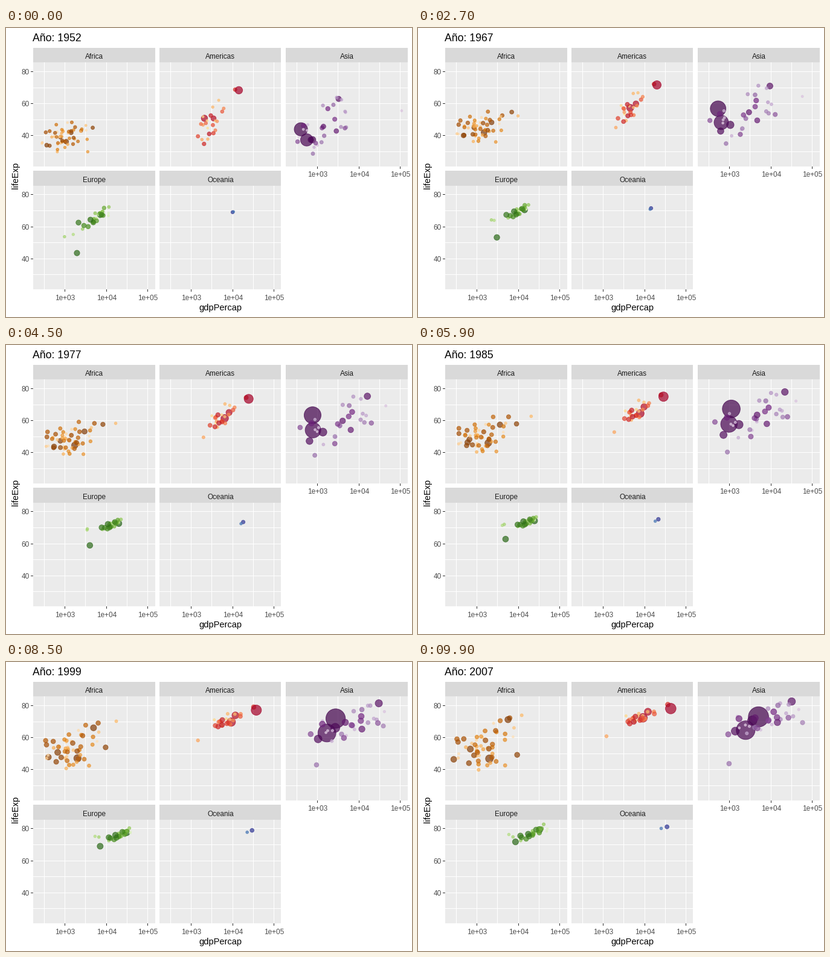
Recreate the animation shown at these times as a matplotlib script. Size 672 px wide and 480 px high, loop 10000 ms.

```python
import numpy as np
import matplotlib.pyplot as plt
from matplotlib.animation import FuncAnimation
from matplotlib.colors import LinearSegmentedColormap
from matplotlib.patches import Rectangle

plt.rcParams["font.family"] = "Liberation Sans"

W, H, FRAMES = 672, 480, 100
X_LO, X_SCALE = 2.2355, 68.62      # log10 at the panel's left edge, px per decade
Y_LO, Y_SCALE = 20.65, 2.66        # years at the panel's bottom edge, px per year
LEFTS, BOTTOMS = (45.1, 254.0, 463.1), (230.4, 434.8)
PANEL_W, PANEL_H, STRIP_H = 201.9, 172.65, 24.4
MAX_POP = 1318.7                   # millions


def cloud(seed, n, max_pop, power, rho, start, middle, end):
    """Random tracks; each stage is (mean log gdp, sd, mean life, sd)."""
    rng = np.random.default_rng(seed)
    u, v = np.clip(rng.normal(size=(2, n)), -1.7, 1.7)
    life_z = rho * u + np.sqrt(1 - rho ** 2) * v
    cols = [max_pop * np.linspace(0.15, 1, n) ** power]
    for gdp, gdp_sd, life, life_sd in (start, middle, end):
        drift = 0.2 * rng.normal(size=(2, n))
        cols += [gdp + gdp_sd * (u + drift[0]), life + life_sd * (life_z + drift[1])]
    return np.transpose(cols)


# Landmark tracks: population, then (log10 gdp, life) at start, middle and end
AFRICA = np.vstack([
    (33, 3.39, 43.1, 3.73, 59.7, 3.79, 72.3),
    (12, 3.55, 30.0, 3.45, 39.7, 3.68, 42.7),
    (65, 2.89, 39.1, 2.87, 47.8, 2.44, 46.5),
    (80, 3.15, 41.9, 3.50, 54.6, 3.75, 71.3),
    (76, 2.56, 34.1, 2.75, 44.7, 2.84, 52.9),
    (6, 3.38, 42.7, 4.26, 59.8, 4.08, 74.0),
    (135, 3.03, 36.3, 3.25, 45.2, 3.30, 46.9),
    (44, 3.67, 45.0, 3.93, 58.0, 3.97, 49.3),
    cloud(3, 44, 42, 2, 0.45,
          (2.98, 0.27, 39.8, 4.8), (3.08, 0.31, 49.3, 5.2), (3.15, 0.38, 55, 8)),
])
AMERICAS = np.vstack([
    (190, 3.32, 50.9, 3.84, 62.5, 3.96, 72.4),
    (33, 4.06, 68.8, 4.35, 75.0, 4.56, 80.7),
    (8.5, 3.26, 37.6, 3.29, 50.7, 3.08, 60.9),
    (109, 3.54, 50.8, 3.94, 66.3, 4.08, 76.2),
    (301, 4.15, 68.4, 4.41, 74.1, 4.63, 78.2),
    cloud(5, 20, 44, 2, 0.5,
          (3.50, 0.18, 52, 8.5), (3.79, 0.18, 65.5, 5), (3.88, 0.21, 73.7, 2.7)),
])
ASIA = np.vstack([
    (32, 2.89, 28.8, 2.94, 39.1, 2.99, 43.8),
    (150, 2.84, 37.5, 2.82, 48.5, 3.14, 64.1),
    (1318.7, 2.60, 44.0, 2.93, 64.8, 3.70, 73.0),
    (1110, 2.74, 37.4, 2.92, 55.4, 3.39, 64.7),
    (223, 2.88, 37.5, 3.16, 54.4, 3.55, 70.7),
    (127, 3.51, 63.0, 4.25, 76.2, 4.50, 82.6),
    (2.5, 5.03, 55.6, 4.63, 70.3, 4.67, 77.6),
    (48, 2.52, 36.3, 2.60, 57.0, 2.97, 62.1),
    cloud(8, 25, 90, 2.5, 0.6,
          (3.20, 0.34, 48.5, 8.5), (3.66, 0.42, 62, 7.5), (3.93, 0.42, 72.3, 5)),
])
EUROPE = np.vstack([
    (3.6, 3.20, 55.2, 3.56, 69.6, 3.77, 76.4),
    (4.6, 2.99, 53.8, 3.58, 70.3, 3.87, 74.9),
    (82, 3.85, 67.5, 4.33, 73.2, 4.51, 79.4),
    (71, 3.29, 43.6, 3.63, 60.3, 3.93, 71.8),
    cloud(11, 26, 61, 3, 0.9,
          (3.75, 0.21, 65.9, 3.8), (4.17, 0.14, 72.8, 1.9), (4.37, 0.19, 77.6, 2.7)),
])
OCEANIA = np.array([
    (20.4, 4.00, 69.1, 4.28, 74.1, 4.54, 81.2),
    (4.1, 4.02, 69.4, 4.22, 73.0, 4.40, 80.2),
])

# name, column, row, tracks, share of the final population at the start, colour ramp
PANELS = [
    ("Africa", 0, 0, AFRICA, 0.26, "#7F3B08 #B35806 #E08214 #FDB863 #FEE0B6"),
    ("Americas", 1, 0, AMERICAS, 0.42, "#A50026 #D73027 #F46D43 #FDAE61 #FEE090"),
    ("Asia", 2, 0, ASIA, 0.39, "#40004B #762A83 #9970AB #C2A5CF #E7D4E8"),
    ("Europe", 0, 1, EUROPE, 0.78, "#276419 #4D9221 #7FBC41 #B8E186 #E6F5D0"),
    ("Oceania", 1, 1, OCEANIA, 0.43, "#313695 #4575B4"),
]

fig = plt.figure(figsize=(W / 96, H / 96), dpi=96, facecolor="white")
ax = fig.add_axes([0, 0, 1, 1])
ax.set(xlim=(0, W), ylim=(H, 0))
ax.axis("off")


def px(col, gdp):
    return LEFTS[col] + (gdp - X_LO) * X_SCALE


def py(row, life):
    return BOTTOMS[row] - (life - Y_LO) * Y_SCALE


def box(x0, y0, x1, y1, color):
    x0, y0, x1, y1 = (int(v) for v in (x0, y0, x1, y1))
    ax.add_patch(Rectangle((x0, y0), x1 - x0, y1 - y0, fc=color, lw=0))


def label(x, y, text, size, color="black", ha="center", **kw):
    return ax.text(x, y, text, size=size, color=color, ha=ha, va="baseline", **kw)


def draw_panel(name, col, row):
    x0, y1 = LEFTS[col], BOTTOMS[row]
    x1, y0 = x0 + PANEL_W, y1 - PANEL_H
    box(x0, y0, x1, y1, "#EBEBEB")
    box(x0, y0 - STRIP_H, x1, y0, "#D9D9D9")
    label((x0 + x1) / 2, y0 - 6.5, name, 8.8, "#1A1A1A")

    for gdp in np.arange(2.5, 5.1, 0.5):
        x = int(px(col, gdp))
        box(x, y0, x + 1, y1, "white")
        if gdp % 1 == 0 and (row == 1 or col == 2):
            box(x, y1, x + 1, y1 + 4, "#333333")
            label(x + 0.5, y1 + 16.8, f"1e+{int(gdp):02d}", 8.8, "#4D4D4D")

    for life in range(30, 81, 10):
        y = int(py(row, life))
        box(x0, y, x1, y + 1, "white")
        if life % 20 == 0 and col == 0:
            box(x0 - 4, y, x0, y + 1, "#333333")
            label(38.5, y + 5, str(life), 8.8, "#4D4D4D", "right")


xs, ys, pops, first_pops, colors = [], [], [], [], []
for name, col, row, tracks, share, ramp in PANELS:
    draw_panel(name, col, row)
    pop = tracks[:, 0]
    rank = np.argsort(np.argsort(-pop))
    cmap = LinearSegmentedColormap.from_list(name, ramp.split())
    colors.extend(cmap(rank / (len(pop) - 1), alpha=0.7))
    xs.append(px(col, tracks[:, 1::2]))
    ys.append(py(row, tracks[:, 2::2]))
    pops.append(pop)
    first_pops.append(pop * share)
xs, ys = np.vstack(xs), np.vstack(ys)
pops, first_pops = np.hstack(pops), np.hstack(first_pops)

label(355, 469.5, "gdpPercap", 11)
label(19.5, 245, "lifeExp", 11, rotation=90, rotation_mode="anchor")
title = label(44.5, 22, "", 13.2, ha="left")
points = ax.scatter(xs[:, 0], ys[:, 0], s=1, facecolors=colors, edgecolors=colors,
                    linewidths=0.7, zorder=3)


def draw(i):
    s = i / (FRAMES - 1)
    title.set_text(f"Año: {round(1952 + 55 * s)}")
    # Parabola through the start, middle and end of each track
    weights = np.array([(1 - s) * (1 - 2 * s), 4 * s * (1 - s), s * (2 * s - 1)])
    points.set_offsets(np.column_stack([xs @ weights, ys @ weights]))
    pop = first_pops + (pops - first_pops) * s
    size = 1.2 + 10.8 * np.sqrt(pop / MAX_POP)
    points.set_sizes(((2.845 * size - 0.5) * 0.75) ** 2)
    return points, title


anim = FuncAnimation(fig, draw, frames=FRAMES, interval=100, repeat=True)
plt.show()
```
